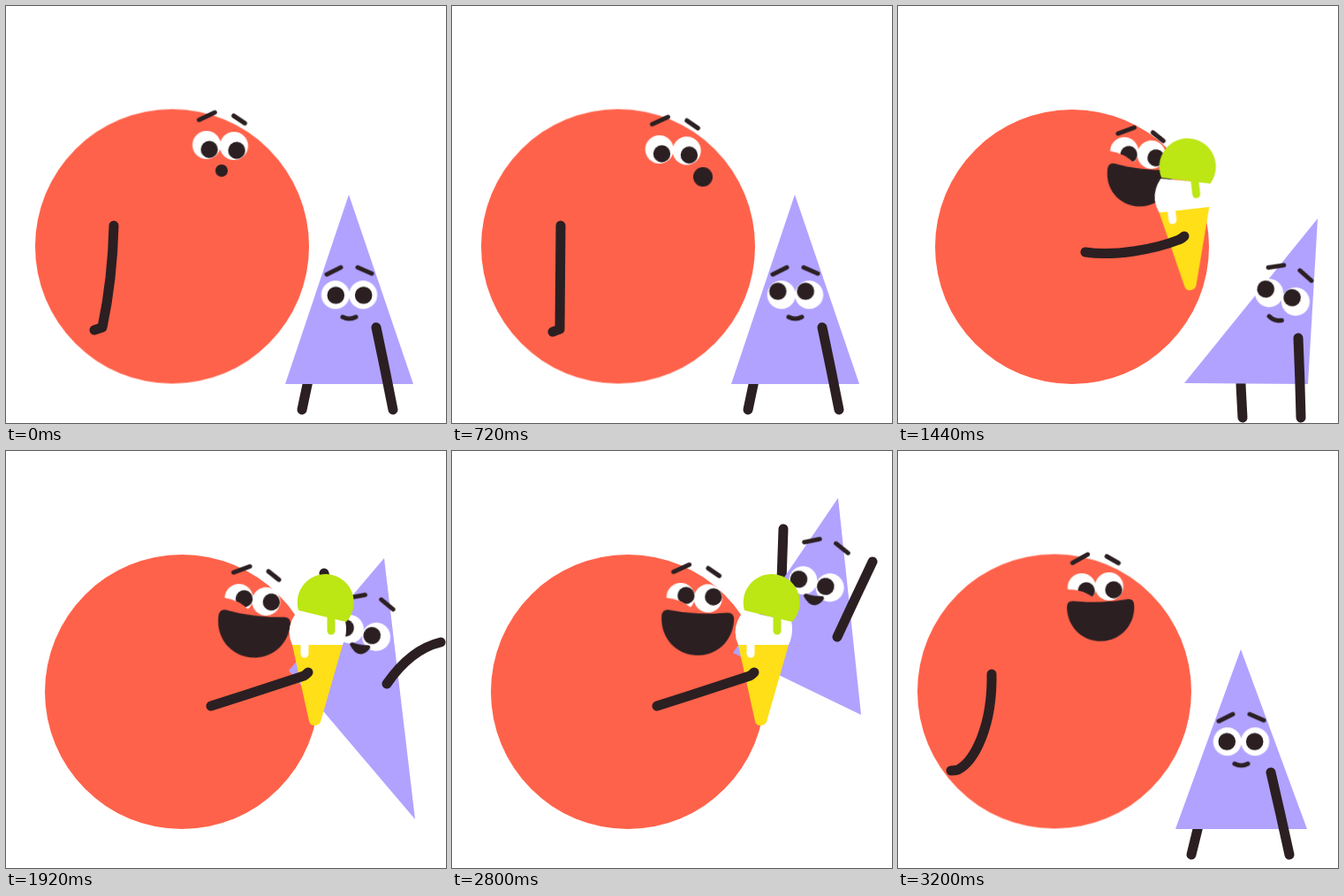
Recreate the animation shown at these times as an HTML page without scripts. Size 498 by 471 pixels, loop 3280 ms.

```html
<!DOCTYPE html>
<html lang="en">
<head>
<meta charset="utf-8">
<title>Ice cream surprise</title>
<style>
html, body { margin: 0; width: 100%; height: 100%; overflow: hidden; background: #fff; }
svg { display: block; width: 498px; height: 471px; }
.ink { fill: #2b1f22; }
.line { fill: none; stroke: #2b1f22; stroke-width: 5; stroke-linecap: round; stroke-linejoin: round; }
.limb { stroke-width: 11; }
.white { fill: #fff; }
.red { fill: #ff624a; }
.lilac { fill: #b1a2ff; }
.drip { fill: none; stroke-width: 9; stroke-linecap: round; }

/* Everything moves on an 80 ms beat, 41 beats per loop */
.a { animation: 3280ms steps(3) infinite; }
.ball { animation-name: ball; }
.face { animation-name: face; }
.look { animation-name: look; }
.brows { animation-name: brows; }
.oh { animation-name: oh; }
.smile { animation-name: smile; }
.arm { animation-name: arm; }
.ice { animation-name: ice; }
.happy { animation-name: happy; animation-timing-function: step-end; }
.calm { animation-name: calm; animation-timing-function: step-end; }
.held { animation-name: held; animation-timing-function: step-end; }
.tri { animation-name: tri; }
.tface { animation-name: tface; }
.tlook { animation-name: tlook; }
.tbrows { animation-name: tbrows; }
.tmouth { animation-name: tmouth; }
.armL { animation-name: armL; }
.armR { animation-name: armR; }

@keyframes happy { 0% { opacity: 0 } 41.463%, 100% { opacity: 1 } }
@keyframes calm { 0% { opacity: 1 } 41.463%, 100% { opacity: 0 } }
@keyframes held { 0% { opacity: 0 } 41.463% { opacity: 1 } 90.243%, 100% { opacity: 0 } }

@keyframes ball {
  0%, 100% { transform: translate(188px, 271.5px) }
  21.951% { transform: translate(188px, 271.5px); animation-timing-function: steps(4) }
  31.707%, 36.585% { transform: translate(166px, 272.5px) }
  43.902% { transform: translate(197px, 272px); animation-timing-function: steps(6) }
  58.536%, 85.365% { transform: translate(199px, 272px) }
  92.682% { transform: translate(172px, 272px); animation-timing-function: steps(2) }
  97.56% { transform: translate(177px, 271.5px); animation-timing-function: steps(1) }
}
@keyframes face {
  0% { transform: translate(242.5px, 157.5px) rotate(2deg); animation-timing-function: steps(9) }
  21.951% { transform: translate(250.2px, 162.7px) rotate(2.7deg); animation-timing-function: steps(4) }
  31.707%, 36.585% { transform: translate(207.5px, 154px) rotate(-3.7deg) }
  43.902% { transform: translate(271.5px, 166px) rotate(7deg); animation-timing-function: steps(6) }
  58.536% { transform: translate(279px, 168px) rotate(7deg); animation-timing-function: steps(11) }
  85.365% { transform: translate(274.3px, 165.7px) rotate(2.8deg) }
  92.682% { transform: translate(216px, 153px) rotate(-3deg); animation-timing-function: steps(2) }
  97.56% { transform: translate(223.5px, 153.5px) rotate(-2deg); animation-timing-function: steps(1) }
  100% { transform: translate(242.5px, 157.5px) rotate(2deg) }
}
@keyframes look {
  0%, 100% { transform: translate(3.3px, 5px); animation-timing-function: steps(9) }
  21.951% { transform: translate(3px, 4.8px); animation-timing-function: steps(4) }
  31.707%, 36.585% { transform: translate(-5.5px, -3px) }
  43.902% { transform: translate(5.5px, 3px); animation-timing-function: steps(6) }
  58.536% { transform: translate(6px, 0px); animation-timing-function: steps(11) }
  85.365% { transform: translate(6px, -2px); animation-timing-function: steps(5) }
  97.56% { transform: translate(5px, 4px); animation-timing-function: steps(1) }
}
@keyframes brows {
  0%, 36.585%, 58.536%, 100% { transform: none }
  43.902% { transform: translateY(9px); animation-timing-function: steps(6) }
}
@keyframes oh {
  0%, 100% { transform: translate(2.5px, 28.4px) scale(.64); animation-timing-function: steps(9) }
  21.951% { transform: translate(35.2px, 28.7px); animation-timing-function: steps(4) }
  31.707%, 41.463% { transform: translate(2.8px, 27.2px) }
}
@keyframes smile {
  0%, 41.463% { transform: translate(5px, 15px) scale(.7); animation-timing-function: steps(1) }
  43.902% { transform: translate(5px, 15px) scale(.9); animation-timing-function: steps(6) }
  58.536%, 85.365% { transform: translate(5px, 15px); animation-timing-function: steps(5) }
  97.56%, 100% { transform: translate(5px, 15px) scale(.93) }
}
@keyframes arm {
  0%, 100% { d: path("M122 248C121 290 116 330 109 363C106 364 103 365 100 366"); animation-timing-function: steps(9) }
  21.951% { d: path("M123 248C123 290 122 330 122 365C119 366 117 367 114 368"); animation-timing-function: steps(4) }
  31.707%, 36.585% { d: path("M82 251C77 300 62 327 38 327C18 326 9 310 7 294"); animation-timing-function: steps(2) }
  41.463% { d: path("M165 272C180 320 220 330 255 318C258 316 261 313 264 310"); animation-timing-function: steps(1) }
  43.902% { d: path("M212 278C245 283 290 275 318 264C320 263 322 262 324 260") }
  51.219%, 85.365% { d: path("M232 288C267 277 303 265 337 254C339 253 340 252 342 250"); animation-timing-function: steps(2) }
  90.243% { d: path("M175 276C185 322 220 332 252 320C255 318 258 316 261 313"); animation-timing-function: steps(1) }
  92.682% { d: path("M98 256C95 310 75 343 45 339C28 336 16 322 10 308"); animation-timing-function: steps(2) }
  97.56% { d: path("M106 252C107 310 87 350 68 360C65 361 62 361 60 361"); animation-timing-function: steps(1) }
}
@keyframes ice {
  0%, 41.463% { transform: translate(280px, 364px) rotate(-25deg); animation-timing-function: steps(1) }
  43.902% { transform: translate(330.5px, 318px) rotate(-6.5deg) }
  51.219%, 85.365% { transform: translate(349px, 307px) rotate(0deg); animation-timing-function: steps(2) }
  90.243%, 100% { transform: translate(275px, 366px) rotate(-30deg) }
}

@keyframes tri {
  0%, 36.585%, 100% { d: path("M388 213L461 427L316 427Z") }
  43.902% { d: path("M475 240L464 427L324 426Z") }
  51.219% { d: path("M473 244L464 427L324 426Z") }
  58.536% { d: path("M428 121L463 416L320 248Z"); animation-timing-function: steps(2) }
  63.414% { d: path("M437 56L463 305L318 229Z"); animation-timing-function: steps(2) }
  68.292% { d: path("M435 72L463 325L318 232Z") }
  75.609% { d: path("M429 122L463 422L320 248Z"); animation-timing-function: steps(2) }
  80.487% { d: path("M435 68L463 325L318 232Z"); animation-timing-function: steps(2) }
  85.365% { d: path("M437 53L463 298L318 228Z") }
  92.682% { d: path("M400 205L464 416L316 400Z"); animation-timing-function: steps(2) }
  97.56% { d: path("M388 224L463 427L314 427Z"); animation-timing-function: steps(1) }
}
@keyframes tface {
  0%, 36.585%, 100% { transform: translate(388.5px, 326.2px) rotate(0deg) }
  43.902% { transform: translate(435px, 329px) rotate(18deg) }
  51.219% { transform: translate(434px, 332px) rotate(18deg) }
  58.536% { transform: translate(404px, 205.5px) rotate(16deg); animation-timing-function: steps(2) }
  63.414% { transform: translate(412.5px, 153px) rotate(15deg); animation-timing-function: steps(2) }
  68.292% { transform: translate(411px, 165px) rotate(15deg) }
  75.609% { transform: translate(405px, 206px) rotate(16deg); animation-timing-function: steps(2) }
  80.487% { transform: translate(411px, 163px) rotate(15deg); animation-timing-function: steps(2) }
  85.365% { transform: translate(412.5px, 150.2px) rotate(15deg) }
  92.682% { transform: translate(394px, 306px) rotate(4deg); animation-timing-function: steps(2) }
  97.56% { transform: translate(388.5px, 328.2px) rotate(0deg); animation-timing-function: steps(1) }
}
@keyframes tlook {
  0%, 100% { transform: translate(.5px, .5px); animation-timing-function: steps(4) }
  9.756%, 36.585% { transform: translate(-4px, -4px) }
  43.902%, 51.219% { transform: translate(-5px, -3px) }
  58.536%, 85.365% { transform: translate(-5px, 0px); animation-timing-function: steps(5) }
  97.56% { transform: translate(-.5px, 0px); animation-timing-function: steps(1) }
}
@keyframes tbrows {
  0%, 36.585%, 100% { transform: none }
  43.902%, 51.219% { transform: translateY(-4px) }
  58.536% { transform: translateY(-11px); animation-timing-function: steps(2) }
  63.414%, 85.365% { transform: translateY(-19px); animation-timing-function: steps(5) }
  97.56% { transform: none }
}
@keyframes tmouth {
  0%, 51.219%, 97.56%, 100% { d: path("M-7.5 25Q0 29 7.5 25Q0 29 -7.5 25Z") }
  58.536%, 85.365% { d: path("M-8 16Q1 17 10 14Q4 28 -8 16Z"); animation-timing-function: steps(5) }
}
@keyframes armL {
  0%, 36.585%, 100% { d: path("M349 390Q342 423 335 456") }
  43.902%, 51.219% { d: path("M387 400Q388 432 390 465") }
  58.536% { d: path("M372 195Q368 165 360 138"); animation-timing-function: steps(2) }
  63.414% { d: path("M372 192Q373 140 375 91"); animation-timing-function: steps(5) }
  75.609% { d: path("M372 210Q372 175 366 140"); animation-timing-function: steps(4) }
  85.365% { d: path("M372 190Q373 140 375 88") }
  92.682% { d: path("M346 375Q340 408 331 440"); animation-timing-function: steps(2) }
  97.56% { d: path("M346 398Q339 428 332 456"); animation-timing-function: steps(1) }
}
@keyframes armR {
  0%, 36.585%, 100% { d: path("M419 363Q429 410 438 456") }
  43.902%, 51.219% { d: path("M453 375Q455 420 456 465") }
  58.536% { d: path("M431 263Q458 224 492 216"); animation-timing-function: steps(2) }
  63.414% { d: path("M436 213Q456 170 476 128"); animation-timing-function: steps(5) }
  75.609% { d: path("M432 265Q452 220 475 194"); animation-timing-function: steps(4) }
  85.365% { d: path("M436 210Q456 167 476 125") }
  92.682% { d: path("M424 345Q440 390 454 436"); animation-timing-function: steps(2) }
  97.56% { d: path("M422 363Q433 410 443 456"); animation-timing-function: steps(1) }
}
</style>
</head>
<body>
<svg viewBox="0 0 498 471" role="img" aria-label="A circle surprises a triangle with an ice cream">
  <circle class="a ball red" r="155"/>

  <g class="a face">
    <g class="white"><circle cx="-15.5" r="16"/><circle cx="15.5" r="16"/></g>
    <g class="a look ink"><circle cx="-15.5" r="9.7"/><circle cx="15.5" r="9.7"/></g>
    <path class="a happy red" d="M-36 2Q-18 0 -1 13V22H-36Z"/>
    <path class="a brows line" d="M-25 -28L-7.5 -37M14 -34L27 -26"/>
    <g class="a calm"><circle class="a oh ink" r="11"/></g>
    <g class="a happy">
      <path class="a smile ink" d="M-34 0Q0 5 34 0Q41 0 41 8C41 33 22 50 0 50C-22 50 -41 33 -41 8Q-41 0 -34 0Z"/>
    </g>
  </g>

  <path class="a armL line limb" d="M349 390Q342 423 335 456"/>
  <path class="a tri lilac" d="M388 213L461 427L316 427Z"/>
  <g class="a tface">
    <g class="white"><circle cx="-15.7" r="16"/><circle cx="15.7" r="16"/></g>
    <g class="a tlook ink"><circle cx="-15.7" r="9.8"/><circle cx="15.7" r="9.8"/></g>
    <path class="a tbrows line" d="M-25.5 -23L-9.5 -31M9.5 -31L25.5 -24"/>
    <path class="a tmouth line ink" style="fill:#2b1f22" d="M-7.5 25Q0 29 7.5 25Q0 29 -7.5 25Z"/>
  </g>
  <path class="a armR line limb" d="M419 363Q429 410 438 456"/>

  <g class="a held">
    <g class="a ice">
      <path fill="#ffdf18" d="M-25 -88H32L7 -1Q5 3 0 3Q-5 3 -6 -2Z"/>
      <path class="white" d="M-25 -88Q-34 -108 -19 -126L35 -115Q38 -101 32 -88Z"/>
      <path class="drip" stroke="#fff" d="M-11 -92V-78"/>
      <path fill="#bce614" d="M-18 -127A32 32 0 1 1 36 -114Z"/>
      <path class="drip" stroke="#bce614" d="M19 -122V-104"/>
    </g>
  </g>
  <path class="a arm line limb" d="M122 248C121 290 116 330 109 363C106 364 103 365 100 366"/>
</svg>
</body>
</html>
```
